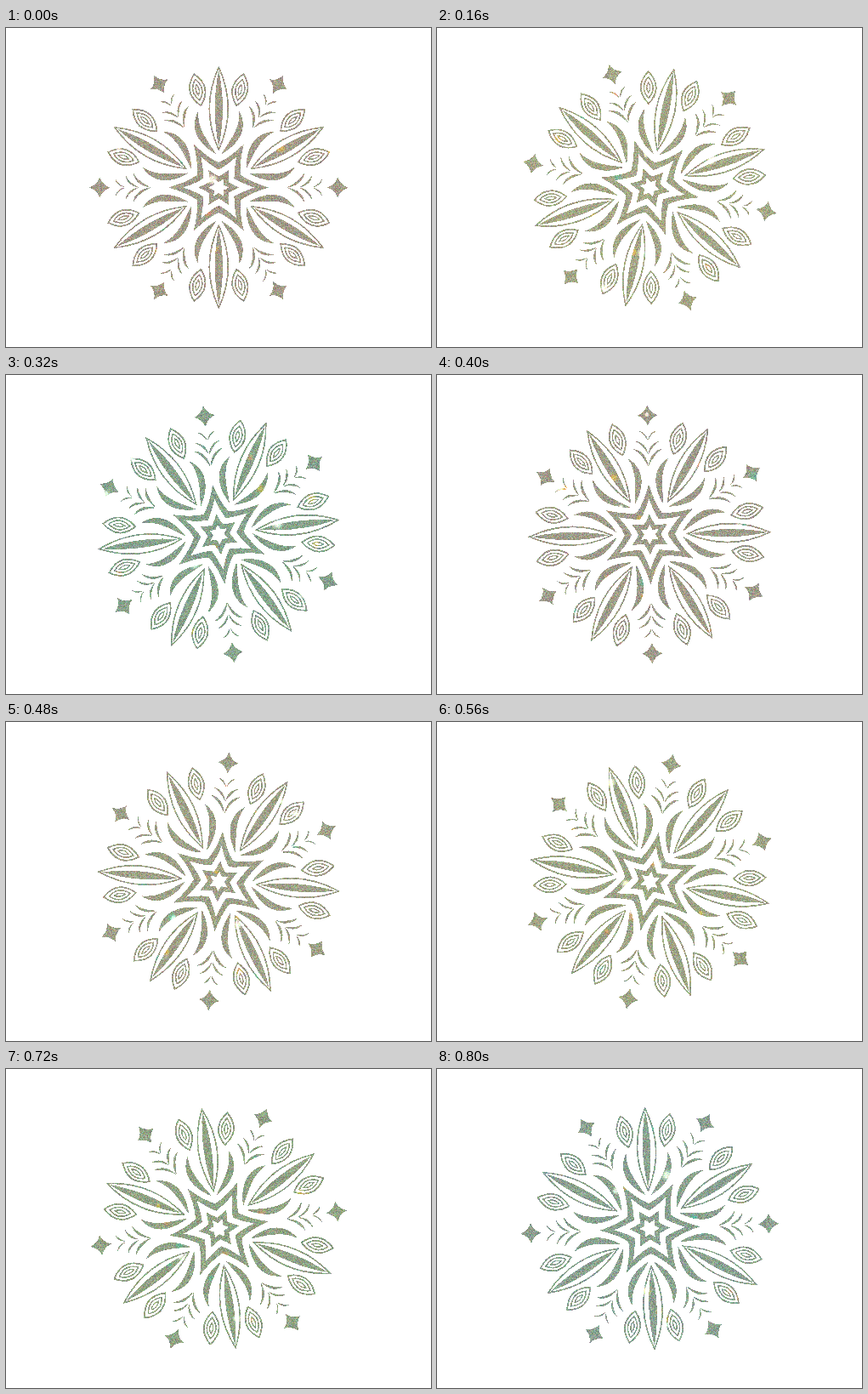
Write an HTML page with a canvas that moves like this. It is 500x375 px and loops after 0.84 s.

```html
<!DOCTYPE html>
<html lang="en">
<head>
<meta charset="utf-8">
<title>Glitter snowflake</title>
<style>
  html, body { margin: 0; height: 100%; overflow: hidden; background: #fff; }
  canvas { display: block; }
</style>
</head>
<body>
<canvas id="stage" width="500" height="375"></canvas>
<script>
const ctx = document.getElementById('stage').getContext('2d', { willReadFrequently: true });
const STEPS = 21, STEP_MS = 40, STEP_DEG = 2.885, CX = 250.3, CY = 187.5;

// Average glitter tint: [step, r, g, b]
const TINTS = [
  [0, 162, 156, 138], [4, 165, 167, 136], [8, 136, 162, 140], [10, 159, 157, 139],
  [14, 158, 165, 135], [18, 146, 163, 134], [20, 140, 162, 145], [21, 162, 156, 138]
];

// Pointed leaf centred on (0, y), a = half length, b = half width
const lens = (y, a, b) =>
  `M0 ${y - a}Q${2 * b} ${y} 0 ${y + a}Q${-2 * b} ${y} 0 ${y - a}Z`;

// Six points with edges pulled towards the centre
function star(tip, valley, pinch) {
  const corner = i => {
    const r = i % 2 ? tip : valley, a = i * Math.PI / 6;
    return [r * Math.sin(a), -r * Math.cos(a)];
  };
  let d = `M${corner(0)}`;
  for (let i = 1; i <= 12; i++) {
    const [x0, y0] = corner(i - 1), [x1, y1] = corner(i);
    d += `Q${(x0 + x1) / 2 * pinch} ${(y0 + y1) / 2 * pinch} ${x1} ${y1}`;
  }
  return d + 'Z';
}

// Both wings of a chevron whose apex points at the centre
const chevron = (r, w, h) => [1, -1].map(s =>
  `M0 ${-r}Q${s * w * 0.42} ${-r - h * 0.75} ${s * w} ${-r - h}` +
  `Q${s * w * 0.15} ${-r - h * 0.9} 0 ${-r}Z`).join('');

const crescents = [1, -1].map(s =>
  `M${s * 24} -90C${s * 36} -68 ${s * 22} -50 ${s * 3} -39` +
  `C${s * 9} -50 ${s * 26} -68 ${s * 24} -90Z`).join('');

const shape = (d, line = 0, turn = 0) => ({ path: new Path2D(d), line, turn });

const arm = [
  shape(lens(-93, 48.5, 11), 1.6),
  shape(lens(-93, 45, 4.6)),
  shape(crescents),
  ...[-12.3, 12.3].flatMap(turn => [
    shape(lens(-117.5, 19, 9), 1.7, turn),
    shape(lens(-117.5, 12.5, 5.4), 1.5, turn),
    shape(lens(-117.5, 6.5, 2), 1.3, turn)
  ]),
  shape(chevron(80, 18, 21), 0, 30),
  shape(chevron(94, 15, 16), 0, 30),
  shape(chevron(110, 11, 12), 0, 30),
  shape('M0 -152.5Q3 -143 12 -140Q3 -137 0 -127.5Q-3 -137 -12 -140Q-3 -143 0 -152.5Z', 0, 30)
];
const stars = new Path2D(star(59, 29.5, 0.87) + star(42, 21, 0.92) +
  star(24, 13, 0.95) + star(12, 6.5, 1));

function random(seed) {
  return () => {
    seed = seed + 0x6D2B79F5 | 0;
    let t = Math.imul(seed ^ seed >>> 15, 1 | seed);
    t = t + Math.imul(t ^ t >>> 7, 61 | t) ^ t;
    return ((t ^ t >>> 14) >>> 0) / 4294967296;
  };
}

function drawFlake(degrees) {
  const rad = Math.PI / 180;
  ctx.clearRect(0, 0, 500, 375);
  ctx.save();
  ctx.translate(CX, CY);
  ctx.rotate(degrees * rad);
  ctx.fill(stars, 'evenodd');
  for (let i = 0; i < 6; i++) {
    for (const { path, line, turn } of arm) {
      ctx.save();
      ctx.rotate(turn * rad);
      ctx.lineWidth = line;
      line ? ctx.stroke(path) : ctx.fill(path);
      ctx.restore();
    }
    ctx.rotate(60 * rad);
  }
  ctx.restore();
}

function tintAt(step) {
  const i = TINTS.findIndex(t => t[0] > step);
  const from = TINTS[i - 1], to = TINTS[i];
  const k = (step - from[0]) / (to[0] - from[0]);
  return [1, 2, 3].map(c => from[c] + (to[c] - from[c]) * k);
}

function addGlitter(step) {
  const rnd = random(step * 977 + 5);
  const tint = tintAt(step);
  const glow = [[90, 90, 85], [50, 20, -40], [-35, 20, 15], [45, 0, -20]];
  const sparks = Array.from({ length: 24 }, (_, i) => {
    const a = rnd() * 2 * Math.PI, r = 145 * Math.sqrt(rnd());
    return { x: CX + r * Math.sin(a), y: CY + r * Math.cos(a), size: 3 + rnd() * 4, glow: glow[i % 4] };
  });
  const image = ctx.getImageData(0, 0, 500, 375), px = image.data;
  for (let i = 0; i < px.length; i += 4) {
    if (px[i + 3] < 120) { px[i + 3] = 0; continue; }
    const x = i / 4 % 500, y = Math.floor(i / 2000);
    const light = (rnd() - 0.5) * 44;
    const color = tint.map(c => c + light + (rnd() - 0.5) * 56);
    for (const s of sparks) {
      const k = 1 - Math.hypot(x - s.x, y - s.y) / s.size;
      if (k > 0) s.glow.forEach((g, c) => color[c] += g * Math.min(1, k * 1.6));
    }
    px.set([...color, 255], i);
  }
  ctx.putImageData(image, 0, 0);
}

let shown = -1;
function tick() {
  const step = Math.floor(performance.now() / STEP_MS) % STEPS;
  if (step !== shown) {
    shown = step;
    drawFlake(step * STEP_DEG);
    addGlitter(step);
  }
  requestAnimationFrame(tick);
}
tick();
</script>
</body>
</html>
```
